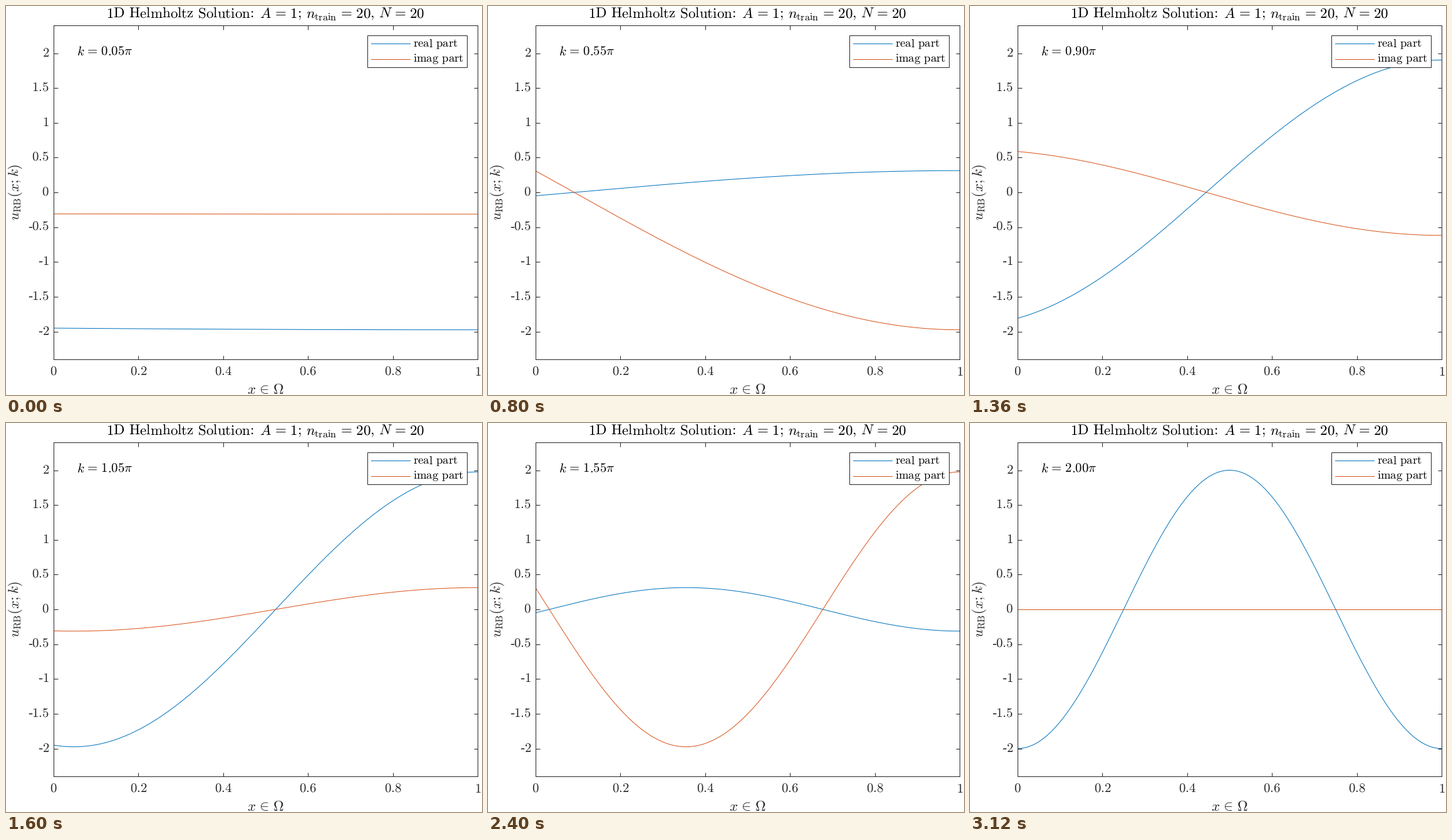
These frames come from a looping animation (760 px wide and 622 px high, 3.2 s). A matplotlib script:

```python
import matplotlib.pyplot as plt
import numpy as np
from matplotlib.animation import FuncAnimation
from matplotlib.lines import Line2D
from matplotlib.patches import Rectangle
from matplotlib.transforms import Affine2D

plt.rcParams.update({
    'mathtext.fontset': 'cm',
    'font.family': 'Liberation Serif',
    'text.hinting': 'none',
})

W, H, DPI = 760, 622, 100
PT = 72 / DPI                      # one pixel in points
LEFT, RIGHT, TOP, BOTTOM = 76, 753, 31, 565
FRAMES, INTERVAL = 40, 80
TICK_SIZE, LABEL_SIZE, LEGEND_SIZE = 15, 16.5, 13.5
BLUE, ORANGE, INK = '#0072BD', '#D95319', '#262626'

# TeX-like spacing around relations and between words
EQ = r'\hspace{0.117}=\hspace{0.117}'
SP = r'\hspace{0.38}'

fig = plt.figure(figsize=(W / DPI, H / DPI), dpi=DPI, facecolor='white')
pixels = Affine2D().scale(1 / W, -1 / H).translate(0, 1) + fig.transFigure


def label(x, y, s, size, color='black', ha='center', **kw):
    return fig.text(x, y, s, fontsize=size, color=color, ha=ha,
                    va='baseline', transform=pixels, **kw)


ax = fig.add_axes([LEFT / W, 1 - BOTTOM / H,
                   (RIGHT - LEFT) / W, (BOTTOM - TOP) / H])
ax.set(xlim=(0, 1), ylim=(-2.4, 2.4),
       xticks=np.linspace(0, 1, 6), yticks=np.linspace(-2, 2, 9))
ax.tick_params(direction='in', top=True, right=True, length=6.5 * PT,
               width=PT, color=INK, labelbottom=False, labelleft=False)
for spine in ax.spines.values():
    spine.set(linewidth=PT, color=INK)

mid_x, mid_y = (LEFT + RIGHT) / 2, (TOP + BOTTOM) / 2

# Tick labels
for v in np.linspace(0, 1, 6):
    label(LEFT + v * (RIGHT - LEFT), 591, f'${v:g}$', TICK_SIZE, INK)
for v in np.linspace(-2, 2, 9):
    y = mid_y - v * (BOTTOM - TOP) / 4.8 + 5.2
    digits = f'{abs(v):g}'
    label(69, y, f'${digits}$', TICK_SIZE, INK, 'right')
    if v < 0:
        width = (1.278 if '.' in digits else 0.5) * TICK_SIZE / PT
        label(69 - width, y, '-', TICK_SIZE, INK, 'right')

# Title and axis labels
title = (r'$\mathrm{1D}' + SP + r'\mathrm{Helmholtz}' + SP +
         r'\mathrm{Solution}\hspace{-0.2}:\hspace{0.306}'
         r'A' + EQ + r'1;\hspace{0.18}'
         r'n_\mathrm{train}' + EQ + r'20,\hspace{0.18}'
         r'N' + EQ + r'20$')
label(mid_x, 19, title, LABEL_SIZE)
label(mid_x, 620, r'$x\hspace{0.117}\in\hspace{0.117}\Omega$',
      LABEL_SIZE, INK)
label(20, mid_y, r'$u_\mathrm{RB}(x;k)$', LABEL_SIZE, INK,
      rotation=90, rotation_mode='anchor')

# Legend
fig.add_artist(Rectangle((577, 47), 159, 51, facecolor='white',
                         edgecolor=INK, linewidth=PT, transform=pixels,
                         zorder=1))
for y, base, name, color in ((60, 65.5, 'real', BLUE),
                             (85, 89.5, 'imag', ORANGE)):
    fig.add_artist(Line2D([583, 645], [y, y], color=color, linewidth=PT,
                          transform=pixels, zorder=2))
    label(650, base, r'$\mathrm{%s}%s\mathrm{part}$' % (name, SP),
          LEGEND_SIZE, ha='left')

x = np.linspace(0, 1, 401)
real, = ax.plot([], [], color=BLUE, linewidth=PT)
imag, = ax.plot([], [], color=ORANGE, linewidth=PT)
k_text = label(113, 78.5, '', TICK_SIZE, ha='left')


def update(i):
    k = 0.05 * (i + 1)
    u = -2 * np.exp(1j * np.pi * k) * np.cos(np.pi * k * (1 - x))
    real.set_data(x, u.real)
    imag.set_data(x, u.imag)
    k_text.set_text(r'$k%s%.2f\pi$' % (EQ, k))
    return real, imag, k_text


anim = FuncAnimation(fig, update, frames=FRAMES, interval=INTERVAL,
                     repeat=True, repeat_delay=0)
plt.show()
```
